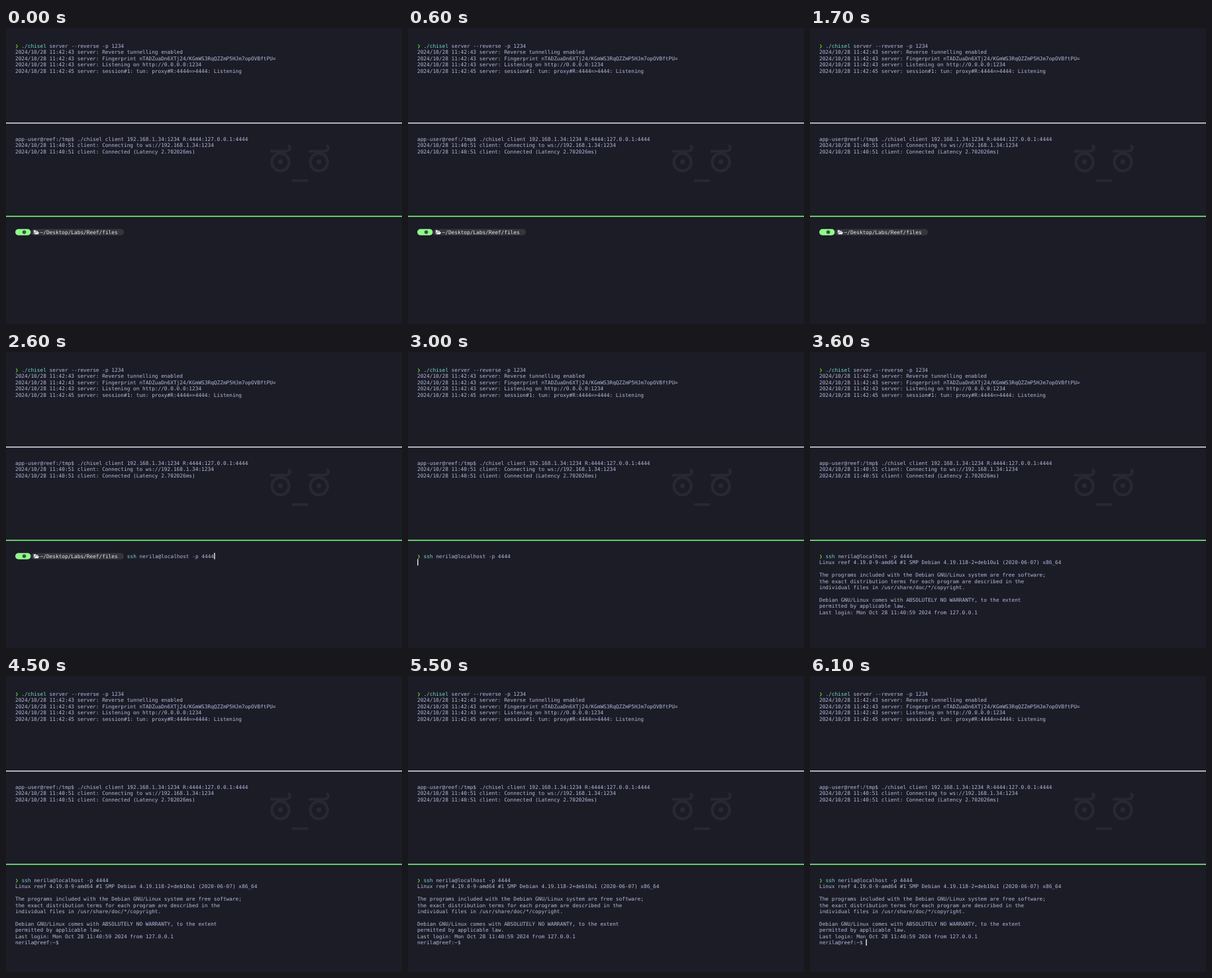
Animation of 598x448 px, one loop 6500 ms. Source, as an HTML page with a canvas:

```html
<!DOCTYPE html>
<html lang="en">
<head>
<meta charset="utf-8">
<title>Reverse tunnel terminal</title>
<style>
  html, body { margin: 0; width: 100%; height: 100%; overflow: hidden; background: #1c1c27; }
  canvas { display: block; width: 598px; height: 448px; }
</style>
</head>
<body>
<canvas id="stage" width="598" height="448"></canvas>
<script>
const ctx = document.getElementById('stage').getContext('2d');
const LOOP = 6500;
const LEFT = 14, CELL = 4.69, LINE = 9.43, PANE = 141;
const COLORS = {
  back: '#1c1c27', text: '#b3bbdc', command: '#73daca', chevron: '#6be00f',
  bright: '#e6e7ee', cursor: '#dcdeea', pill: '#92f88d', path: '#34363b',
  inactive: '#cccccf', active: '#70e874', mark: '#282832', icon: '#31583a'
};

const SERVER = [
  '2024/10/28 11:42:43 server: Reverse tunnelling enabled',
  '2024/10/28 11:42:43 server: Fingerprint nTADZuaDn6XTj24/KGmWS3RqQZZmP5HJm7opOVBftPU=',
  '2024/10/28 11:42:43 server: Listening on http://0.0.0.0:1234',
  '2024/10/28 11:42:45 server: session#1: tun: proxy#R:4444=>4444: Listening'
];
const CLIENT = [
  'app-user@reef:/tmp$ ./chisel client 192.168.1.34:1234 R:4444:127.0.0.1:4444',
  '2024/10/28 11:40:51 client: Connecting to ws://192.168.1.34:1234',
  '2024/10/28 11:40:51 client: Connected (Latency 2.702026ms)'
];
const KERNEL = 'Linux reef 4.19.0-9-amd64 #1 SMP Debian 4.19.118-2+deb10u1 (2020-06-07) x86_64';
const MOTD = [
  'The programs included with the Debian GNU/Linux system are free software;',
  'the exact distribution terms for each program are described in the',
  'individual files in /usr/share/doc/*/copyright.',
  '',
  'Debian GNU/Linux comes with ABSOLUTELY NO WARRANTY, to the extent',
  'permitted by applicable law.',
  'Last login: Mon Oct 28 11:40:59 2024 from 127.0.0.1'
];
const SSH_ARGS = 'nerila@localhost -p 4444';
const REMOTE_PROMPT = 'nerila@reef:~$ ';

// Times in ms
const PASTE = 2600, ENTER = 2900, GREETING = 3500, BANNER = 3600, LOGIN = 3900;
const CURSOR_ON = [[100, 600], [1100, 1700], [2200, 3500], [4000, 4500], [5000, 5500], [6000, 6500]];

const colX = col => LEFT + col * CELL;
const baseY = (pane, row) => 29.8 + pane * PANE + row * LINE;
const cellTop = (pane, row) => baseY(pane, row) - 7.5;

function write(text, pane, row, col = 0, color = COLORS.text) {
  ctx.fillStyle = color;
  ctx.fillText(text, colX(col), baseY(pane, row));
}

function writeLines(lines, pane, row) {
  lines.forEach((line, i) => write(line, pane, row + i));
}

function writeCommand(name, args, pane, col) {
  write(name, pane, 0, col, COLORS.command);
  write(args, pane, 0, col + name.length + 1);
}

function capsule(col, cols, color) {
  ctx.fillStyle = color;
  ctx.beginPath();
  ctx.roundRect(colX(col), cellTop(2, 0), cols * CELL, LINE, LINE / 2);
  ctx.fill();
}

function folder(x, y) {
  ctx.fillStyle = COLORS.bright;
  ctx.beginPath();
  ctx.moveTo(x, y + 6);
  ctx.lineTo(x, y);
  ctx.lineTo(x + 2.6, y);
  ctx.lineTo(x + 3.5, y + 1);
  ctx.lineTo(x + 6.5, y + 1);
  ctx.lineTo(x + 6.5, y + 2.4);
  ctx.lineTo(x + 2, y + 2.4);
  ctx.closePath();
  ctx.moveTo(x + 2.4, y + 3);
  ctx.lineTo(x + 8.4, y + 3);
  ctx.lineTo(x + 6.7, y + 6.2);
  ctx.lineTo(x + 0.7, y + 6.2);
  ctx.closePath();
  ctx.fill();
}

function eye(x) {
  ctx.lineWidth = 4.6;
  ctx.beginPath();
  ctx.ellipse(x, 203, 13, 13.2, 0, 0, Math.PI * 2);
  ctx.stroke();
  ctx.lineWidth = 4;
  ctx.beginPath();
  ctx.moveTo(x - 15.5, 186.5);
  ctx.lineTo(x + 7, 186.5);
  ctx.bezierCurveTo(x + 14, 186.5, x + 17, 180.5, x + 11.5, 177.5);
  ctx.stroke();
  ctx.beginPath();
  ctx.arc(x, 202.5, 3.7, 0, Math.PI * 2);
  ctx.fill();
}

function watermark() {
  ctx.fillStyle = ctx.strokeStyle = COLORS.mark;
  eye(414.5);
  eye(472.5);
  ctx.fillRect(432, 229, 24, 4);
}

function pathPrompt() {
  capsule(0, 5, COLORS.pill);
  capsule(5, 30, COLORS.path);
  ctx.fillStyle = COLORS.icon;
  ctx.beginPath();
  ctx.arc(27.5, 309, 2.8, 0, Math.PI * 2);
  ctx.fill();
  folder(41.8, 306);
  write('~/Desktop/Labs/Reef/files', 2, 0, 8, COLORS.bright);
}

function drawShell(t) {
  if (t < ENTER) {
    pathPrompt();
    if (t >= PASTE) writeCommand('ssh', SSH_ARGS, 2, 36);
    return;
  }
  write('❯', 2, 0, 0, COLORS.chevron);
  writeCommand('ssh', SSH_ARGS, 2, 2);
  if (t >= GREETING) write(KERNEL, 2, 1);
  if (t >= BANNER) writeLines(MOTD, 2, 3);
  if (t >= LOGIN) write(REMOTE_PROMPT, 2, 10);
}

function cursorCell(t) {
  if (t < PASTE) return [36, 0];
  if (t < ENTER) return [40 + SSH_ARGS.length, 0];
  if (t < LOGIN) return [0, 1];
  return [REMOTE_PROMPT.length, 10];
}

function drawCursor(t) {
  if (!CURSOR_ON.some(([from, to]) => t >= from && t < to)) return;
  const [col, row] = cursorCell(t);
  ctx.fillStyle = COLORS.cursor;
  ctx.fillRect(colX(col), cellTop(2, row) - 0.3, 1.5, LINE + 0.3);
}

function draw(t) {
  ctx.fillStyle = COLORS.back;
  ctx.fillRect(0, 0, 598, 448);
  watermark();
  ctx.fillStyle = COLORS.inactive;
  ctx.fillRect(0, 143, 598, 1.7);
  ctx.fillStyle = COLORS.active;
  ctx.fillRect(0, 284.2, 598, 1.7);

  ctx.font = '7.79px "DejaVu Sans Mono", monospace';
  ctx.textRendering = 'geometricPrecision';
  write('❯', 0, 0, 0, COLORS.chevron);
  writeCommand('./chisel', 'server --reverse -p 1234', 0, 2);
  writeLines(SERVER, 0, 1);
  writeLines(CLIENT, 1, 0);
  drawShell(t);
  drawCursor(t);
}

const start = performance.now();
function tick() {
  draw((performance.now() - start) % LOOP);
  requestAnimationFrame(tick);
}
tick();
</script>
</body>
</html>
```
